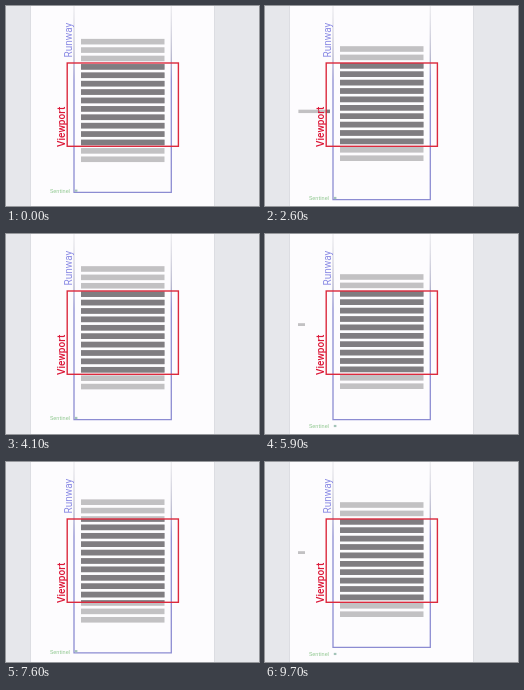
Recreate the animation shown at these times as an HTML page. Size 253 by 200 pixels, loop 10 s.

```html
<!DOCTYPE html>
<html lang="en">
<head>
<meta charset="utf-8">
<title>Infinite scroller</title>
<style>
  html, body { margin: 0; width: 100%; height: 100%; overflow: hidden; background: #e6e7eb; }
  svg { display: block; width: 253px; height: 200px; }
  text { font-family: Roboto, sans-serif; font-size: 10px; }
</style>
</head>
<body>
<svg viewBox="0 0 253 200">
  <defs>
    <clipPath id="view"><rect x="61" y="57" width="111.5" height="83.3"/></clipPath>
    <linearGradient id="fade" gradientUnits="userSpaceOnUse" x1="0" y1="0" x2="0" y2="75">
      <stop offset="0" stop-color="#d4d4da" stop-opacity=".4"/>
      <stop offset=".7" stop-color="#b4b4cc"/>
      <stop offset="1" stop-color="#8c8cd2"/>
    </linearGradient>
  </defs>
  <rect x="24.5" y="-2" width="184" height="204" fill="#fdfcfe" stroke="#dcdde2"/>
  <path id="runway" fill="none" stroke="url(#fade)" stroke-width="1.3"/>
  <g fill="#c2c1c3"><g id="rows"></g></g>
  <use href="#rows" fill="#807d81" clip-path="url(#view)"/>
  <rect x="61.2" y="57" width="111.2" height="83.3" fill="none" stroke="#dc2a3e" stroke-width="1.4"/>
  <text transform="translate(66 51.5) rotate(-90)" fill="#8b8be4">Runway</text>
  <text transform="translate(59.2 141) rotate(-90)" fill="#dc1838" font-weight="500">Viewport</text>
  <g id="sentinel" fill="#93c993">
    <text x="44" y="186" style="font-size:5.6px">Sentinel</text>
    <rect x="68.8" y="182.5" width="2.6" height="2.2" fill="#a3c3b8"/>
  </g>
</svg>
<script>
  const LOOP = 10000, CYCLE = 4000, LEAD = 800, LAST = 9700, STEP = 100;
  const PITCH = 8.4, ROW_H = 5.6, LEFT = 75, RIGHT = 158.5, FIRST = 40.2, COUNT = 14;
  const POOL = { left: 33, right: 40, y: 89.2, h: 2.8 };

  const $ = id => document.getElementById(id);
  const mix = (a, b, p) => a + (b - a) * p;
  const progress = (t, from, to) => Math.min(1, Math.max(0, (t - from) / (to - from)));
  const smooth = p => p * p * (3 - 2 * p);
  const cubic = p => p < .5 ? 4 * p ** 3 : 1 - 4 * (1 - p) ** 3;

  const rows = Array.from({ length: COUNT + 1 }, () =>
    $('rows').appendChild(document.createElementNS('http://www.w3.org/2000/svg', 'rect')));

  function place(row, left, right, y, h) {
    const box = { x: left, y, width: right - left, height: h };
    for (const key in box) row.setAttribute(key, box[key]);
  }

  function draw(time) {
    const c = (time + LEAD) % CYCLE;
    const shift = PITCH * (1 - smooth(progress(c, 0, 1030)));
    const recycle = cubic(progress(c, 1220, 1900));
    const lower = PITCH * smooth(progress(c, 2000, 2520));
    const extend = PITCH * smooth(progress(c, 2650, 3050));
    const reuse = cubic(progress(c, 3100, 3900));

    for (let i = 0; i < COUNT; i++)
      place(rows[i], LEFT, RIGHT, FIRST + shift + PITCH * i, ROW_H);

    // The spare row leaves the top, waits in the pool, then joins the bottom.
    const leaving = c < 2500;
    const home = leaving ? FIRST + shift - PITCH : FIRST + PITCH * COUNT;
    const k = leaving ? 1 - recycle : reuse;
    place(rows[COUNT], mix(POOL.left, LEFT, k ** 3), mix(POOL.right, RIGHT, k),
      mix(POOL.y, home, k), mix(POOL.h, ROW_H, k));

    $('runway').setAttribute('d', `M68 0V${185.3 + shift + extend}H165.3V0`);
    $('sentinel').setAttribute('transform', `translate(0 ${shift + lower})`);
  }

  function tick() {
    const t = performance.now() % LOOP;
    draw(Math.min(LAST, Math.floor(t / STEP) * STEP));
    requestAnimationFrame(tick);
  }
  tick();
</script>
</body>
</html>
```
